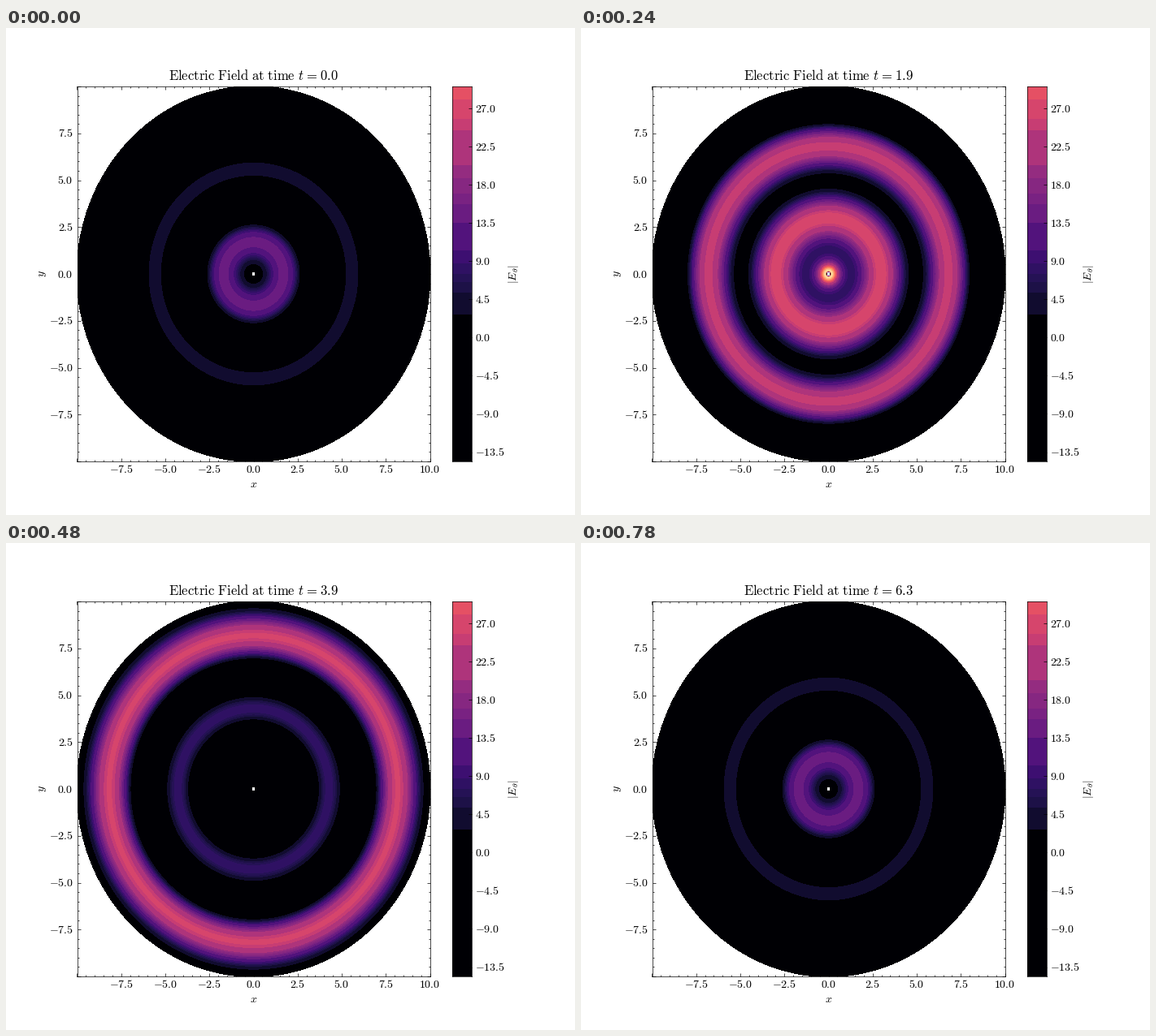
Animation of 700 by 600 pixels, one loop 0.8 s. Source, as a matplotlib script:

```python
import numpy as np
import matplotlib as mpl
import matplotlib.pyplot as plt
from matplotlib.animation import FuncAnimation
from matplotlib.ticker import MultipleLocator

W, H = 700, 600
FRAMES, INTERVAL = 40, 20
LEFT, TOP, AX_W, AX_H = 87.5, 72, 434, 462
BAR_X, BAR_W = 549, 23.5
BAR_MIN, BAR_MAX = -14.6, 29.6
R_MIN, R_MAX = 0.1, 10
V_MAX = 46.5
EDGE = 0.04  # the filled disc covers its border pixels

plt.rcParams.update({
    "mathtext.fontset": "cm",
    "axes.linewidth": 0.5,
    "xtick.direction": "in", "ytick.direction": "in",
    "xtick.major.size": 3, "ytick.major.size": 3,
    "xtick.minor.size": 1.5, "ytick.minor.size": 1.5,
    "xtick.major.width": 0.5, "ytick.major.width": 0.5,
    "xtick.minor.width": 0.5, "ytick.minor.width": 0.5,
})

# Colour bands: each takes the map colour at its middle value
edges = np.array([2.7, 5.3, 6.5, 7.5, 8.7, 10.3, 13.5, 15.7, 17, 18.8, 20.3,
                  24.4, 25.8, 28.1, 30, 32, 34, 36, 38, 40, 42, 44])
middles = (edges + np.append(edges[1:], V_MAX)) / 2
shades = np.append(0, middles / V_MAX)
palette = (mpl.colormaps["magma"](shades)[:, :3] * 255).round().astype(np.uint8)


def paint(values):
    return palette[np.searchsorted(edges, values)]


def field(r, t):
    """Dipole field with near-field terms under a standing envelope."""
    u = r - t
    wave = (1 - 1 / r**2) * np.sin(u) + np.cos(u) / r
    envelope = np.sin(2 * np.pi * (r - R_MIN) / (R_MAX - R_MIN))
    return 30 * envelope * wave


fig = plt.figure(figsize=(W / 100, H / 100), dpi=100, facecolor="white")


def pixel_axes(x, y, w, h):
    return fig.add_axes([x / W, 1 - (y + h) / H, w / W, h / H])


def put(x, y, text, size=10, ha="center", va="baseline", **kw):
    return fig.text(x / W, 1 - y / H, text, size=size, ha=ha, va=va, **kw)


# Main plot, sampled once per screen pixel
sx, sy = AX_W / 20, AX_H / 20
xs = (np.arange(88, 522) + 0.5 - LEFT) / sx - 10
ys = 10 - (np.arange(AX_H) + 0.5) / sy
r = np.hypot(xs[None, :], ys[:, None])
outside = (r > R_MAX + EDGE) | (r < R_MIN - EDGE / 2)
r_safe = np.clip(r, R_MIN, R_MAX)


def picture(t):
    rgb = paint(field(r_safe, t))
    rgb[outside] = 255
    return rgb


ax = pixel_axes(LEFT, TOP, AX_W, AX_H)
image = ax.imshow(picture(0), aspect="auto", interpolation="nearest",
                  extent=(xs[0] - 0.5 / sx, xs[-1] + 0.5 / sx, -10, 10))
ax.set(xlim=(-10, 10), ylim=(-10, 10))
for axis in (ax.xaxis, ax.yaxis):
    axis.set_major_locator(MultipleLocator(2.5))
    axis.set_minor_locator(MultipleLocator(0.5))
ax.tick_params(which="both", top=True, right=True,
               labelbottom=False, labelleft=False)

for v in np.arange(-7.5, 10.1, 2.5):
    label = f"${v:.1f}$"
    put(LEFT + (v + 10) * sx, 548, label)
    if v < 10:
        put(82.6, TOP + (10 - v) * sy + 4.5, label, ha="right")

# Colour bar
bar = pixel_axes(BAR_X, TOP, BAR_W, AX_H)
unit = AX_H / (BAR_MAX - BAR_MIN)
column = BAR_MIN + (np.arange(AX_H) + 0.5) / unit
bar.imshow(paint(column)[:, None, :], origin="lower", aspect="auto",
           interpolation="nearest", extent=(0, 1, BAR_MIN, BAR_MAX))
bar_ticks = np.arange(-3, 7) * 4.5
bar.set_xticks([])
bar.set_yticks(bar_ticks)
bar.yaxis.tick_right()
bar.tick_params(labelright=False)
for v in bar_ticks:
    put(576.8, TOP + (BAR_MAX - v) * unit + 4.5, f"${v:.1f}$", ha="left")

put(304.5, 562.5, "$x$", va="center")
put(44.7, 302.5, "$y$", va="center", rotation=90)
put(624.7, 303, r"$|E_\theta|$", va="center", rotation=90)
title = put(304.5, 63.7, "", size=12)


def update(i):
    t = 2 * np.pi * i / (FRAMES - 1)
    image.set_data(picture(t))
    title.set_text(r"$\mathrm{Electric\ Field\ at\ time}\ "
                   rf"t\hspace{{0.09}}=\hspace{{0.09}}{t:.1f}$")
    return image, title


anim = FuncAnimation(fig, update, frames=FRAMES, interval=INTERVAL,
                     repeat=True, repeat_delay=0, blit=False)
plt.show()
```
